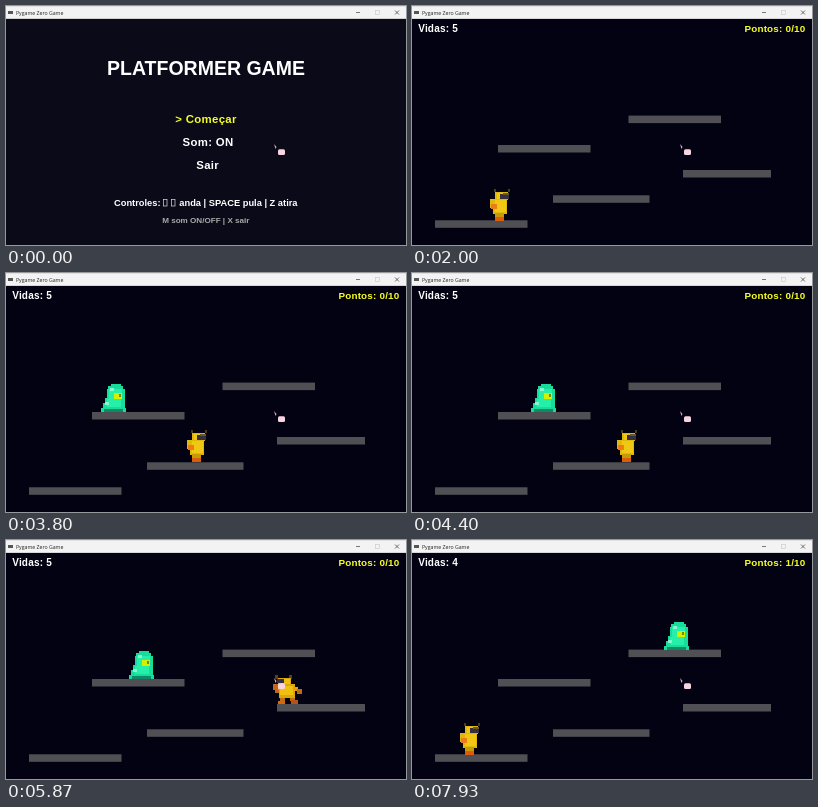
These frames come from a looping animation (400x239 px, 8 s). An HTML page with a canvas:

```html
<!DOCTYPE html>
<html lang="pt">
<head>
<meta charset="utf-8">
<title>Pygame Zero Game</title>
<style>
html, body { margin: 0; width: 100%; height: 100%; overflow: hidden; background: #02020f; }
canvas { display: block; width: 400px; height: 239px; }
</style>
</head>
<body>
<canvas id="stage" width="400" height="239"></canvas>
<script>
const ctx = document.getElementById('stage').getContext('2d');
const LOOP = 8000, STEP = 1000 / 15;
const GRAVITY = 900, JUMP_SPEED = 300;
const GAME_START = 600, KILL = 6450, RESPAWN = 7865;
const YELLOW = '#f6ff20';

const platforms = [
  [23, 214.3, 92.5], [86, 139, 92.5], [141, 189.3, 96.5], [216.5, 109.6, 92.5], [271, 164, 88]
];

// Sprites are rectangles [colour, x, y, w, h] around the middle of the feet.
const standing = [
  ['#4a3a18', -6, -32, 2, 3], ['#4a3a18', 8, -32, 2, 3],
  ['#e0b80c', -5, -29, 13, 8], ['#f0c814', -3, -28, 10, 7],
  ['#e0b80c', -7, -22, 14, 15], ['#f0c814', -5, -21, 11, 12],
  ['#e0b80c', -10, -22, 4, 9], ['#343040', 0, -27, 9, 5],
  ['#6a5820', 3, -28, 6, 2], ['#ee7a18', -9, -17, 6, 5],
  ['#c89a08', -5, -8, 9, 4], ['#dc5c0c', -5, -4, 9, 4]
];
const running = [
  ['#53401c', -5, -29, 3, 4], ['#53401c', 9, -29, 3, 4],
  ['#d8a80c', -4, -26, 13, 7], ['#f0c010', -3, -25, 9, 5],
  ['#d8a80c', -8, -20, 16, 14], ['#f0c010', -6, -18, 13, 9],
  ['#e8a010', 7, -18, 4, 4], ['#c4661a', 9, -20, 5, 6], ['#c4661a', 8, -14, 4, 3],
  ['#e8a010', -11, -17, 4, 4], ['#c4661a', -15, -15, 5, 5],
  ['#343040', 3, -25, 7, 4], ['#c07010', -8, -6, 5, 3], ['#c07010', 2, -6, 5, 3],
  ['#b45418', -11, -4, 7, 4], ['#dc6410', 2, -3, 7, 3]
];
const slime = [
  ['#18dc9a', -2, -28, 10, 3], ['#18dc9a', -5, -26, 15, 5], ['#18dc9a', -6, -23, 18, 12],
  ['#18dc9a', -8, -14, 20, 10], ['#18dc9a', -10, -9, 22, 7], ['#18dc9a', -12, -4, 25, 4],
  ['#24f0aa', -4, -23, 13, 10], ['#24f0aa', -6, -13, 14, 8],
  ['#86f6d2', -3, -24, 4, 3], ['#86f6d2', -8, -10, 4, 3],
  ['#0d8a68', -9, -3, 19, 3], ['#d4f000', 1, -19, 8, 6], ['#6c8a10', 6, -18, 2, 3]
];

const playerPath = [[0, 58], [1730, 58], [2000, 88], [2425, 88], [3353, 191], [4182, 191], [4992, 281]];
const jumps = [
  { start: 2560, from: 214, to: 189 },
  { start: 4427, from: 189, to: 164 },
  { start: 6150, from: 164, to: 164 },
  { start: 7650, from: 164, to: 164 }
];
const slimes = [
  { start: 3460, end: KILL, ground: 139, path: [[3793, 107], [4930, 152], [5180, 162], [5870, 135], [6450, 112]] },
  { start: 6670, end: LOOP, ground: 110, path: [[7100, 240], [7930, 264]] }
];

function along(path, t) {
  if (t <= path[0][0]) return path[0][1];
  for (let i = 1; i < path.length; i++) {
    const [t0, a] = path[i - 1], [t1, b] = path[i];
    if (t <= t1) return a + (b - a) * (t - t0) / (t1 - t0);
  }
  return path[path.length - 1][1];
}

function rect(color, x, y, w, h) {
  ctx.fillStyle = color;
  ctx.fillRect(x, y, w, h);
}

function text(string, x, y, size, color, align = 'left', font = 'bold', family = '"Liberation Sans", Arial, sans-serif') {
  ctx.font = `${font} ${size}px ${family}`;
  ctx.textAlign = align;
  ctx.fillStyle = color;
  ctx.fillText(string, x, y);
}

function sprite(parts, x, feet, flip = false) {
  ctx.save();
  ctx.translate(Math.round(x), Math.round(feet));
  if (flip) ctx.scale(-1, 1);
  for (const part of parts) rect(...part);
  ctx.restore();
}

function drawWindowBar() {
  rect('#f3f3f3', 0, 0, 400, 12.7);
  rect('#d8d8d8', 0, 0, 400, 0.7);
  rect('#555', 2, 5, 5, 3);
  text('Pygame Zero Game', 10, 8.5, 5.2, '#222', 'left', 'normal', '"Open Sans", sans-serif');
  rect('#777', 350, 6, 4, 1);
  ctx.lineWidth = 0.7;
  ctx.strokeStyle = '#ccc';
  ctx.strokeRect(369.5, 4.5, 4, 4);
  ctx.strokeStyle = '#333';
  ctx.beginPath();
  ctx.moveTo(389, 4.5); ctx.lineTo(393, 8.5);
  ctx.moveTo(393, 4.5); ctx.lineTo(389, 8.5);
  ctx.stroke();
}

function drawMenu() {
  rect('#0a0a19', 0, 12.7, 400, 227);
  text('PLATFORMER GAME', 200, 69, 19.5, '#fff', 'center');
  ctx.letterSpacing = '0.3px';
  text('> Começar', 200, 117.2, 11.4, YELLOW, 'center');
  text('Som: ON', 202, 139.7, 11.4, '#fff', 'center');
  text('Sair', 201.7, 162.7, 11.4, '#fff', 'center');
  ctx.letterSpacing = '0px';
  text('Controles:', 108, 200, 9.3, '#fff');
  text('anda | SPACE pula | Z atira', 291.5, 200, 9.3, '#fff', 'right');
  ctx.strokeStyle = '#ddd';
  ctx.lineWidth = 0.7;
  for (const x of [157.5, 165.5]) ctx.strokeRect(x, 193.5, 3.5, 6.5);
  text('M som ON/OFF | X sair', 199.8, 217, 8.1, '#aaa', 'center');
}

function drawPlayer(t) {
  if (t >= RESPAWN) return sprite(standing, 58, 214.5);
  let feet = 214.5, airborne = false;
  for (const { start, from, to } of jumps) {
    if (t < start) break;
    const s = (t - start) / 1000;
    const y = from - JUMP_SPEED * s + GRAVITY / 2 * s * s;
    airborne = s < JUMP_SPEED / GRAVITY || y < to;
    feet = airborne ? y : to;
  }
  const onLastLedge = t > 4992;
  sprite(airborne || onLastLedge ? running : standing, along(playerPath, t), feet, onLastLedge);
}

function drawSlimes(t) {
  for (const { start, end, ground, path } of slimes) {
    if (t < start || t >= end) continue;
    const s = (t - start) / 1000;
    sprite(slime, along(path, t), Math.min(ground, ground - 50 + GRAVITY / 2 * s * s));
  }
}

function drawGame(t) {
  rect('#020213', 0, 12.7, 400, 227);
  for (const [x, y, w] of platforms) rect('#505054', x, y, w, 7.5);
  drawSlimes(t);
  drawPlayer(t);
  ctx.letterSpacing = '0.2px';
  text(`Vidas: ${t < RESPAWN ? 5 : 4}`, 6.2, 26.3, 10, '#fff');
  text(`Pontos: ${t < KILL ? 0 : 1}/10`, 393.5, 26.3, 9.9, YELLOW, 'right');
  ctx.letterSpacing = '0px';
}

function drawCursor() {
  ctx.fillStyle = '#e8a8b8';
  ctx.beginPath();
  ctx.moveTo(268, 138); ctx.lineTo(270.5, 141); ctx.lineTo(269.5, 143);
  ctx.fill();
  ctx.fillStyle = '#f8d4e0';
  ctx.beginPath();
  ctx.roundRect(272, 143.2, 7, 5.8, 1.5);
  ctx.fill();
}

const begin = performance.now();
function frame() {
  const elapsed = (performance.now() - begin) % LOOP;
  const t = Math.floor((elapsed + 7) / STEP) * STEP;
  if (t < GAME_START) drawMenu(); else drawGame(t);
  drawWindowBar();
  drawCursor();
  requestAnimationFrame(frame);
}
frame();
</script>
</body>
</html>
```
